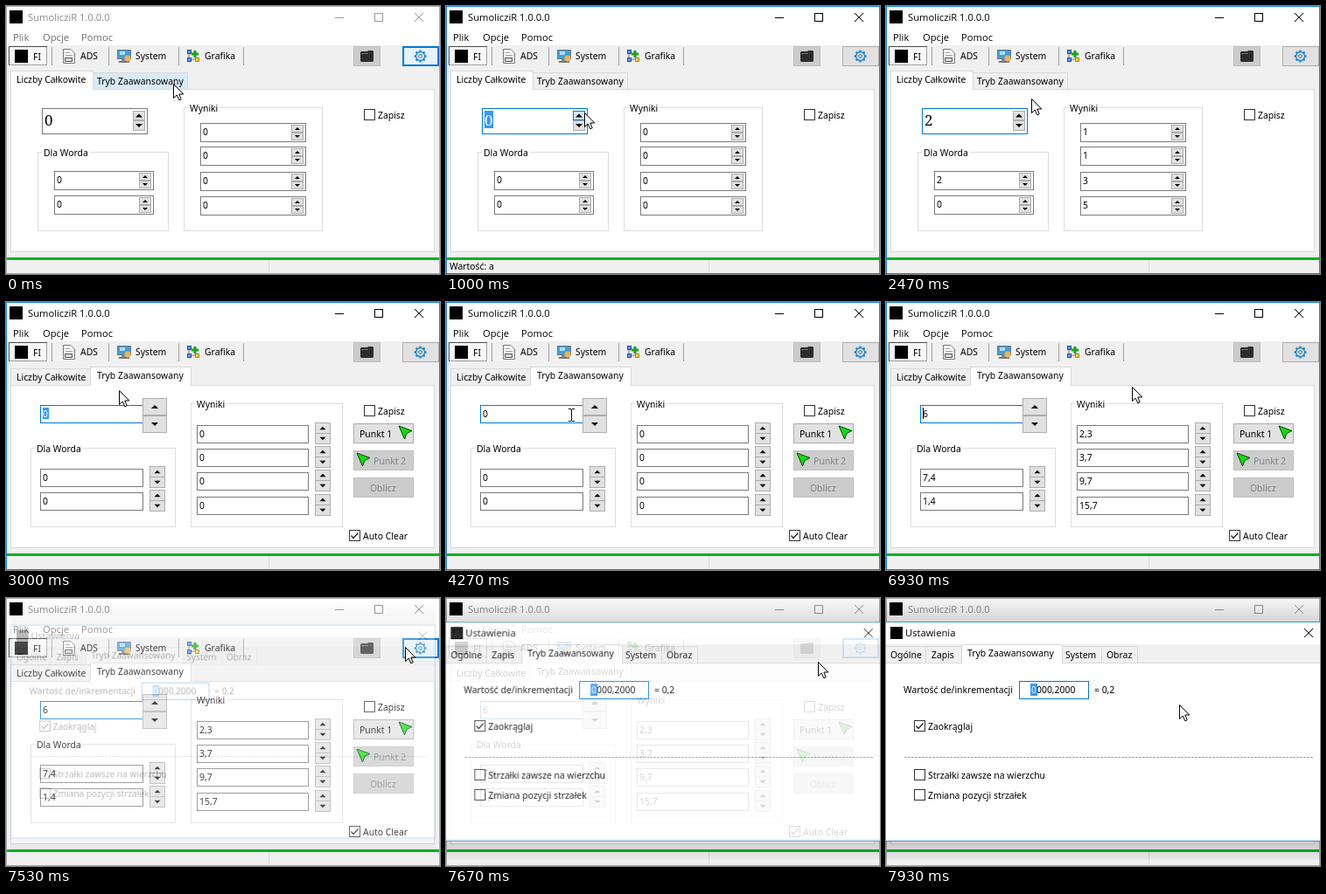
An HTML page with a canvas for the animation above (8000 ms loop, 496 by 307 pixels).

```html
<!DOCTYPE html>
<html lang="pl">
<head>
<meta charset="utf-8">
<style>
html, body { margin: 0; width: 100%; height: 100%; overflow: hidden; background: #f0f0f0; }
canvas { display: block; width: 496px; height: 307px; }
</style>
</head>
<body>
<canvas id="stage" width="496" height="307"></canvas>
<script>
const stage = document.getElementById('stage').getContext('2d');
const layer = document.createElement('canvas').getContext('2d');
let c = stage;

const UI = '10.4px "Noto Sans", sans-serif';
const CAPTION = '11.2px "Open Sans", sans-serif';
const BIG = '17px "Noto Serif", serif';
const BLUE = '#0078d7';
const LOOP = 8000, FPS = 15;
const APP = 'SumolicziR 1.0.0.0';

// Ticks at which the interface changes
const ACTIVATE = 14, HINT_OFF = 18, PRESS1 = 27, RELEASE1 = 29, PRESS2 = 31, LEAVE = 35,
      SWITCH = 43, FOCUS = 56, CARET_OFF = 64, STEP = 70, REPEAT = 77, DIALOG = 112;

// Pointer path: tick, x, y
const PATH = [
  [0, 191, 89], [13, 158, 122], [34, 158, 122], [37, 166, 106], [41, 148, 84],
  [43, 146, 84], [47, 112, 118], [52, 143, 129], [98, 143, 129], [111, 456, 56],
  [113, 456, 56], [119, 335, 122]
];

const clamp = (v, a, b) => Math.min(b, Math.max(a, v));
const inside = (p, x, y, w, h) => p.x >= x && p.x < x + w && p.y >= y && p.y < y + h;
const num = v => String(Math.round(v * 10) / 10).replace('.', ',');

function pointer(k) {
  let i = 0;
  while (i < PATH.length - 2 && k > PATH[i + 1][0]) i++;
  const [k0, x0, y0] = PATH[i], [k1, x1, y1] = PATH[i + 1];
  const u = clamp((k - k0) / (k1 - k0), 0, 1), e = u * u * (3 - 2 * u);
  return { x: Math.round(x0 + (x1 - x0) * e), y: Math.round(y0 + (y1 - y0) * e) };
}

function fill(x, y, w, h, color) {
  c.fillStyle = color;
  c.fillRect(x, y, w, h);
}

function box(x, y, w, h, bg, line) {
  fill(x, y, w, h, line);
  fill(x + 1, y + 1, w - 2, h - 2, bg);
}

function frame(x, y, w, h, color) {
  c.strokeStyle = color;
  c.lineWidth = 1;
  c.strokeRect(x + .5, y + .5, w - 1, h - 1);
}

function text(s, x, y, color = '#000', font = UI) {
  c.font = font;
  c.fillStyle = color;
  c.fillText(s, x, y);
}

function poly(points, color, line) {
  c.beginPath();
  for (let i = 0; i < points.length; i += 2) c.lineTo(points[i], points[i + 1]);
  c.closePath();
  c.fillStyle = color;
  c.fill();
  if (line) stroke(line);
}

function stroke(color, width = 1) {
  c.strokeStyle = color;
  c.lineWidth = width;
  c.stroke();
}

function lines(color, width, ...segments) {
  c.beginPath();
  for (const [x0, y0, x1, y1] of segments) {
    c.moveTo(x0, y0);
    c.lineTo(x1, y1);
  }
  stroke(color, width);
}

function cross(x, y, color) {
  lines(color, 1, [x, y, x + 10, y + 10], [x + 10, y, x, y + 10]);
}

function arrowButton(x, y, w, h, up, size, hot) {
  box(x, y, w, h, hot ? '#cce4f7' : '#e1e1e1', hot ? BLUE : '#adadad');
  const mx = x + w / 2, my = y + h / 2, d = up ? -size / 2 : size / 2;
  poly([mx - size, my - d, mx + size, my - d, mx, my + d], '#000');
}

function spin(x, y, w, value) {
  box(x, y, w, 22, '#fff', '#7a7a7a');
  text(value, x + 3, y + 14);
  arrowButton(x + w - 17, y + 2, 14, 9, true, 3);
  arrowButton(x + w - 17, y + 11, 14, 9, false, 3);
}

function pairField(x, y, w, value) {
  box(x, y, w, 21, '#fff', '#7a7a7a');
  text(value, x + 3, y + 14);
  arrowButton(x + w + 7, y - 3, 18, 13, true, 3.5);
  arrowButton(x + w + 7, y + 9, 18, 13, false, 3.5);
}

function group(x, y, w, h, label) {
  frame(x, y, w, h, '#dcdcdc');
  c.font = UI;
  fill(x + 5, y, c.measureText(label).width + 4, 1, '#fff');
  text(label, x + 7, y + 5);
}

function check(x, y, label, on) {
  box(x, y, 13, 13, '#fff', '#333');
  if (on) {
    c.beginPath();
    c.moveTo(x + 2.5, y + 6.5);
    c.lineTo(x + 5, y + 9.5);
    c.lineTo(x + 10.5, y + 3.5);
    stroke('#222', 1.3);
  }
  text(label, x + 16, y + 11);
}

function tab(x, w, y, label, selected, hot, tx) {
  const top = selected ? y : y + 2, bottom = y + 21;
  box(x, top, w, bottom - top + 1, selected ? '#fff' : hot ? '#d8eaf9' : '#f0f0f0', '#d9d9d9');
  if (selected) fill(x + 1, bottom, w - 2, 1, '#fff');
  text(label, tx, selected ? y + 14 : y + 16);
}

function greenArrow(x, y) {
  poly([x, y, x + 15, y + 5.5, x + 9, y + 8.5, x + 6.5, y + 15], '#0be00b', '#103c10');
}

function titleBar(active) {
  const ink = active ? '#000' : '#999';
  fill(0, 0, 496, 45, '#fff');
  fill(4, 5, 15, 15, '#000');
  text(APP, 25, 17, active ? '#000' : '#8a8a8a', CAPTION);
  fill(376, 13, 10, 1, ink);
  frame(421, 8, 10, 10, ink);
  cross(467, 8, ink);
  [['Plik', 8], ['Opcje', 42], ['Pomoc', 86]].forEach(([s, x]) =>
    text(s, x, 40, active ? '#000' : '#6d6d6d', CAPTION));
}

function toolIcons() {
  fill(10, 50, 15, 15, '#000');
  // document
  poly([65.5, 49.5, 74, 49.5, 78.5, 54, 78.5, 65.5, 65.5, 65.5], '#fff', '#777');
  lines('#999', 1, [68, 53.5, 73, 53.5], [68, 56.5, 76, 56.5]);
  box(67, 59, 9, 5, '#ddd', '#555');
  // monitor
  box(127, 50, 16, 11, '#3fa0dc', '#777');
  fill(130, 52, 6, 4, '#a8dcf8');
  fill(132, 61, 6, 2, '#888');
  fill(129, 63, 12, 2, '#777');
  c.beginPath();
  c.arc(139, 60, 3.5, 0, 7);
  c.fillStyle = '#e8b45a';
  c.fill();
  // points
  lines('#777', 1, [209, 52, 209, 61], [209, 61, 218, 61]);
  box(207, 50, 5, 5, '#6a94e8', '#234ca8');
  box(207, 59, 5, 5, '#6a94e8', '#234ca8');
  box(216, 59, 5, 5, '#f2d24c', '#a8861c');
  lines('#16a516', 3, [212, 55, 220, 55], [216, 51, 216, 59]);
}

function gear(x, y) {
  for (let i = 0; i < 8; i++) {
    const a = i * Math.PI / 4, dx = Math.cos(a), dy = Math.sin(a);
    lines('#1b82d1', 2.2, [x + dx * 5, y + dy * 5, x + dx * 7, y + dy * 7]);
  }
  for (const [r, w] of [[5, 1.3], [2, 1]]) {
    c.beginPath();
    c.arc(x, y, r, 0, 7);
    stroke('#1b82d1', w);
  }
}

function toolbar(hot) {
  fill(0, 45, 496, 26, '#f0f0f0');
  box(3, 46, 44, 22, '#f8f8f8', '#a0a0a0');
  lines('#505050', 1, [3, 46.5, 47, 46.5], [3.5, 46, 3.5, 68]);
  toolIcons();
  [['FI', 31, 62], ['ADS', 85, 61], ['System', 148, 61], ['Grafika', 227, 61]].forEach(a => text(...a));
  [52, 117, 197, 271].forEach(x => fill(x, 47, 1, 21, '#a0a0a0'));
  box(397, 46, 31, 23, '#cccccc', '#bfbfbf');
  poly([405, 53, 406, 52, 413, 52, 414, 51, 419, 51, 420, 52, 420, 63, 419, 64, 406, 64, 405, 63], '#2b2b2b');
  lines('#777', 1, [406, 54.5, 414, 54.5]);
  box(453, 46, 42, 23, hot ? '#e5f1fb' : '#e1e1e1', hot ? BLUE : '#adadad');
  if (hot) frame(454, 47, 40, 21, BLUE);
  gear(473.5, 57.5);
}

function simplePage(k, p) {
  const value = k < PRESS1 ? 0 : k < PRESS2 ? 1 : 2;
  const done = value === 2, selected = k >= ACTIVATE && k < PRESS1;
  box(41, 117, 121, 30, '#fff', k >= ACTIVATE ? BLUE : '#7a7a7a');
  if (selected) fill(44, 120, 10, 20, '#3399ff');
  text(value, 44, 137, selected ? '#fff' : '#000', BIG);
  const hot = inside(p, 145, 120, 14, 11) && !(k >= RELEASE1 && k < PRESS2);
  arrowButton(145, 120, 14, 11, true, 4, hot && k < LEAVE);
  arrowButton(145, 131, 14, 12, false, 4);
  group(36, 167, 150, 91, 'Dla Worda');
  spin(55, 189, 114, done ? 2 : 0);
  spin(55, 217, 114, 0);
  group(203, 116, 159, 142, 'Wyniki');
  [1, 1, 3, 5].forEach((v, i) => spin(222, [134, 161, 190, 218][i], 121, done ? v : 0));
}

function actionButton(y, label, x, enabled) {
  box(397, y, 69, 23, enabled ? '#e1e1e1' : '#cccccc', enabled ? '#adadad' : '#bfbfbf');
  text(label, x, y + 16, enabled ? '#000' : '#838383');
}

function advancedPage(k, p) {
  const value = k < STEP ? 0 : k < REPEAT ? .2 : Math.min(6, .4 * (k - REPEAT + 1));
  box(39, 118, 118, 21, '#fff', BLUE);
  if (k < FOCUS) fill(42, 121, 7, 13, '#3399ff');
  text(num(value), 42, 132, k < FOCUS ? '#fff' : '#000');
  if (k >= FOCUS && k < CARET_OFF) fill(48, 121, 1, 13, '#000');
  if (k >= STEP && k < DIALOG) fill(42, 121, 1, 13, '#000');
  arrowButton(156, 110, 28, 20, true, 4, inside(p, 156, 110, 28, 20));
  arrowButton(156, 130, 28, 20, false, 4);
  group(28, 167, 166, 91, 'Dla Worda');
  pairField(39, 191, 118, num(value * 1.236));
  pairField(39, 218, 118, num(value * .236));
  group(211, 116, 174, 142, 'Wyniki');
  [.382, .618, 1.618, 2.618].forEach((r, i) =>
    pairField(218, [141, 168, 195, 223][i], 128, num(value * r)));
  actionButton(139, 'Punkt 1', 404, true);
  greenArrow(449, 142);
  actionButton(170, 'Punkt 2', 420, false);
  greenArrow(401, 173);
  actionButton(201, 'Oblicz', 416, false);
  check(392, 261, 'Auto Clear', true);
}

function mainWindow(k, p) {
  const active = k >= ACTIVATE && k < DIALOG, advanced = k >= SWITCH;
  fill(0, 0, 496, 307, '#f0f0f0');
  titleBar(active);
  toolbar(k < ACTIVATE || k >= DIALOG || inside(p, 453, 46, 42, 23));
  box(5, 95, 485, 187, '#fff', '#d9d9d9');
  const hot = inside(p, 100, 76, 108, 19);
  if (advanced) {
    tab(5, 92, 74, 'Liczby Całkowite', false, false, 12);
    tab(96, 116, 74, 'Tryb Zaawansowany', true, false, 104);
    advancedPage(k, p);
  } else {
    tab(99, 109, 74, 'Tryb Zaawansowany', false, hot, 104);
    tab(5, 95, 74, 'Liczby Całkowite', true, false, 12);
    simplePage(k, p);
  }
  check(409, 118, 'Zapisz', false);
  fill(1, 288, 494, 3, '#06b025');
  fill(300, 292, 1, 13, '#d7d7d7');
  const hint = advanced ? inside(p, 156, 110, 28, 40) : k < HINT_OFF && inside(p, 145, 118, 16, 26);
  if (hint) text('Wartość: a', 4, 302);
  frame(0, 0, 496, 307, active ? '#1883d7' : '#a8a8a8');
}

function dialogContent() {
  // soft shadow
  for (const [y0, y1] of [[28, 0], [279, 300]]) {
    const g = c.createLinearGradient(0, y0, 0, y1);
    g.addColorStop(0, 'rgba(0,0,0,.17)');
    g.addColorStop(1, 'rgba(0,0,0,.03)');
    fill(-2, Math.min(y0, y1), 500, Math.abs(y1 - y0), g);
  }
  box(-2, 27, 500, 252, '#fff', '#3c96dc');
  fill(5, 33, 14, 14, '#000');
  text('Ustawienia', 22, 44, '#000', CAPTION);
  cross(478, 35, '#000');
  fill(-1, 53, 498, 21, '#f0f0f0');
  fill(-1, 74, 498, 1, '#d9d9d9');
  tab(-1, 47, 53, 'Ogólne', false, false, 5);
  tab(45, 42, 53, 'Zapis', false, false, 52);
  tab(201, 46, 53, 'System', false, false, 205);
  tab(246, 42, 53, 'Obraz', false, false, 252);
  tab(86, 116, 53, 'Tryb Zaawansowany', true, false, 93);
  fill(-1, 276, 498, 2, '#f0f0f0');
  text('Wartość de/inkrementacji', 20, 109);
  box(152, 95, 80, 21, '#fff', BLUE);
  fill(165, 98, 8, 14, '#3399ff');
  text('0', 166, 109, '#fff');
  text('000,2000', 172, 109);
  text('= 0,2', 238, 109);
  check(32, 140, 'Zaokrąglaj', true);
  c.setLineDash([3, 1]);
  lines('#92a4b4', 1, [21, 182.5, 489, 182.5]);
  c.setLineDash([]);
  check(32, 196, 'Strzałki zawsze na wierzchu', false);
  check(32, 219, 'Zmiana pozycji strzałek', false);
}

// Painted once, then faded and scaled in as one picture
layer.canvas.width = 504;
layer.canvas.height = 307;
layer.translate(4, 0);
c = layer;
dialogContent();
c = stage;

function dialog(k) {
  const a = clamp((k - DIALOG) / 3.6, 0, 1);
  const s = 1 - .055 * (1 - a) ** 2;
  c.save();
  c.globalAlpha = a;
  c.translate(248, 153);
  c.scale(s, s);
  c.drawImage(layer.canvas, -252, -153);
  c.restore();
}

function cursor(k, p) {
  c.save();
  c.translate(p.x, p.y);
  if (k > SWITCH && k < DIALOG && inside(p, 39, 118, 117, 21)) {
    lines('#000', 1, [.5, -6, .5, 7], [-3, -6.5, 0, -6.5], [1, -6.5, 4, -6.5], [-3, 7.5, 0, 7.5], [1, 7.5, 4, 7.5]);
  } else {
    poly([.5, .5, .5, 16.5, 4.2, 13, 6.8, 18.8, 9.2, 17.8, 6.8, 12, 11.8, 12], '#fff', '#000');
  }
  c.restore();
}

function draw(now) {
  const k = Math.floor((now % LOOP + 4) * FPS / 1000) % (LOOP * FPS / 1000);
  const p = pointer(k);
  mainWindow(k, p);
  dialog(k);
  cursor(k, p);
}

const start = performance.now();
function loop() {
  draw(performance.now() - start);
  requestAnimationFrame(loop);
}
loop();
</script>
</body>
</html>
```
